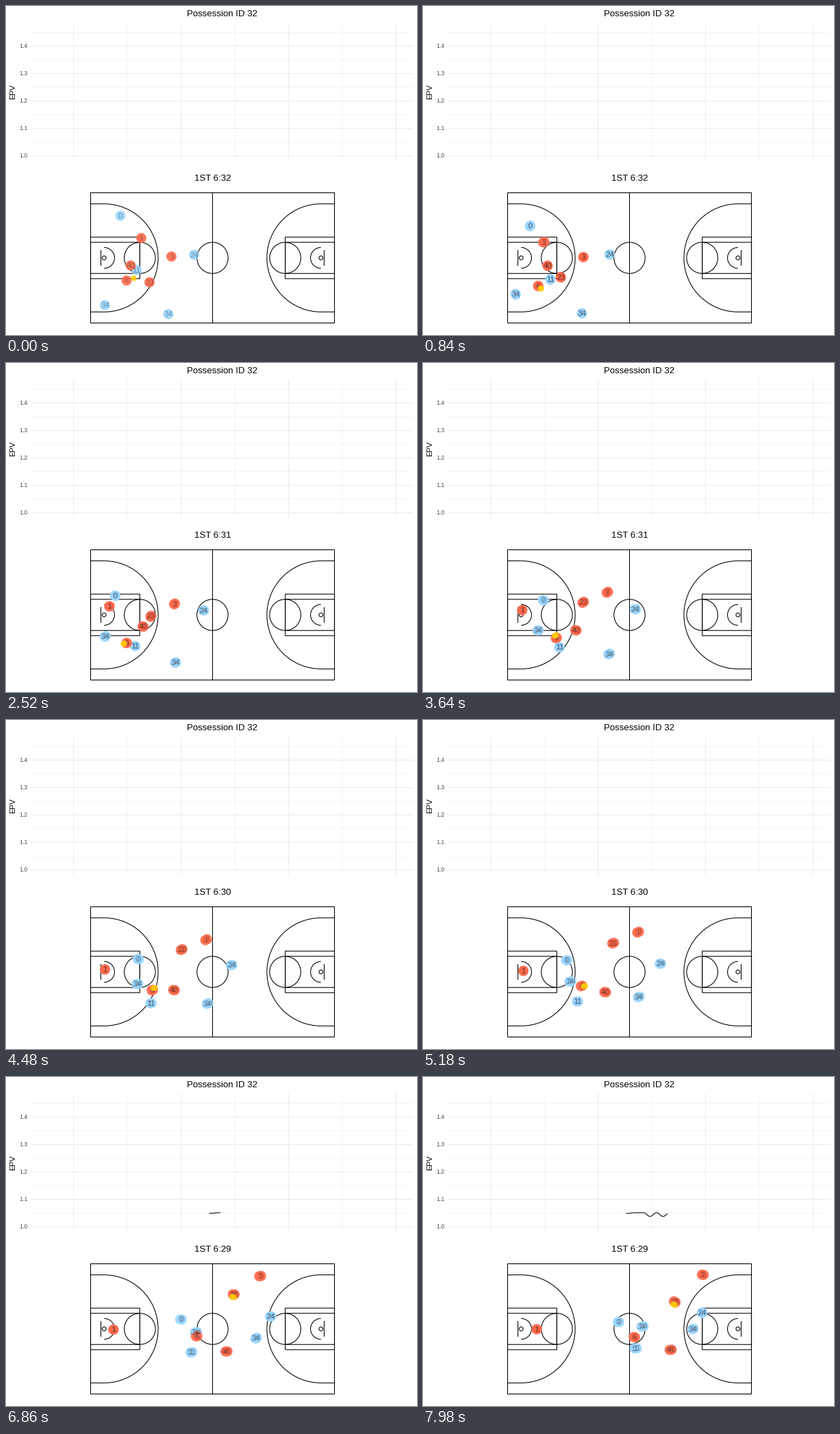
A matplotlib script for the animation above (8000 ms loop, 600 by 480 pixels).

```python
import numpy as np
import matplotlib.pyplot as plt
from matplotlib.animation import FuncAnimation
from matplotlib.patches import Arc, Circle, Rectangle

plt.rcParams["font.family"] = "Liberation Sans"
plt.rcParams["path.snap"] = False
PT = 0.72            # points per pixel at 100 dpi
STEP, TICK, LOOP = 140, 40, 8000
LAG = 0.29           # each step shows two tracking samples, +-LAG apart
DISC, BALL, NUM = 14.8, 8.4, 11.38
BLUE, RED, GOLD = "#9BD6FF", "#FF6A4D", "#FFCB00"
FT = 3.79            # pixels per foot
CX, CY = 301, 367.5  # centre of the court
EPV_X, EPV_STEP, EPV_SPEED = 296, 46, 5.5

fig = plt.figure(figsize=(6, 4.8), dpi=100, facecolor="white")
ax = fig.add_axes([0, 0, 1, 1])
ax.set(xlim=(-0.5, 599.5), ylim=(480, 0))
ax.axis("off")


def line(xs, ys, color="black", width=1.07, z=2):
    return ax.plot(xs, ys, color=color, lw=width * PT, zorder=z,
                   solid_capstyle="butt")[0]


def baseline(y, size):
    """Baseline that centres digits vertically on y."""
    return y + 0.358 * size - 0.5


def label(x, y, s, size, ha="center", color="black", **kw):
    return ax.text(x, baseline(y, size), s, size=size * PT, ha=ha,
                   va="baseline", color=color, **kw)


def shape(patch):
    patch.set(fill=False, edgecolor="black", linewidth=1.07 * PT, zorder=2)
    ax.add_patch(patch)


def draw_chart():
    for i in range(5):
        y = 58.5 + 40 * i
        line([36, 594], [y, y], "#EBEBEB", z=1)
        line([36, 594], [y - 20, y - 20], "#EBEBEB", 0.53, 1)
        label(31, y, f"{1.4 - 0.1 * i:.1f}", 8.8, "right", "#4D4D4D")
    for i in range(7):
        x = 98.2 + 78.45 * i
        line([x, x], [24, 226], "#EBEBEB", 0.53 if i % 2 else 1.07, 1)
    label(315, 10.5, "Possession ID 32", 13.2)
    ax.text(9.5, 124.5, "EPV", size=11 * PT, rotation=90,
            ha="center", va="center")


def draw_court():
    w, h, arc = 178, 95, 20.8 * FT
    shape(Rectangle((CX - w, CY - h), 2 * w, 2 * h))
    line([CX, CX], [CY - h, CY + h])
    shape(Circle((CX, CY), 6 * FT))
    for s in (-1, 1):
        base = CX + s * w
        board, hoop, foul = (CX + s * d * FT for d in (43, 41.75, 28))
        for half in (8 * FT, 6 * FT):
            shape(Rectangle((min(base, foul), CY - half),
                            abs(base - foul), 2 * half))
        shape(Circle((foul, CY), 6 * FT))
        shape(Circle((hoop, CY), 0.75 * FT))
        line([board, board], [CY - 3 * FT, CY + 3 * FT])
        turn = 90 * s
        for r in (4 * FT, arc):
            shape(Arc((hoop, CY), 2 * r, 2 * r, theta1=turn, theta2=turn + 180))
        for y in (CY - arc, CY + arc):
            line([base, hoop], [y, y])


def run(*points):
    """Cubic motion through four points spread over the loop."""
    coef = np.polyfit((0, 18, 37, 57), points, 3)
    return lambda t: t ** np.arange(3, -1, -1) @ coef


blues = [
    ("0", run((166.5, 306), (159, 339.5), (209.5, 350.5), (285, 357.5))),
    ("24", run((274, 363), (288, 361), (346, 355.5), (407, 344))),
    ("11", run((190, 385), (188, 413), (225, 410.5), (310, 396))),
    ("34", run((144, 436.5), (144.5, 399), (214.5, 381.5), (320, 364))),
    ("34", run((236.5, 449.5), (247, 437), (314.5, 404), (393.5, 367.5))),
]
reds = [
    ("1", run((197, 338.5), (150.5, 355), (146, 366), (165.5, 368))),
    ("3", run((241, 365.5), (245.5, 351.5), (313.5, 309.5), (408, 288.5))),
    ("40", run((181.5, 378.5), (199.5, 384.5), (265.5, 397), (361, 398))),
    ("6", run((175.5, 400.5), (175.5, 408.5), (231, 388), (308, 379.5))),
    ("23", run((209, 403), (211, 369.5), (277, 325.5), (367, 328))),
]
players = blues + reds
passer, receiver = reds[3][1], reds[4][1]


def ball_at(t):
    """Circles the passer, then flies to the receiver."""
    turn = np.radians(10.3 * t - 18)
    reach = 4 + 7 * np.exp(-t / 4)
    held = passer(t) + reach * np.array([np.cos(turn), np.sin(turn)])
    caught = receiver(t) + (-1, 4)
    return held + (caught - held) * np.clip((t - 38) / 9, 0, 1)


def epv_curve(u):
    rise = 0.9 * np.clip((u - 4) / 8, 0, 1)
    waves = 5.4 * np.sin(np.pi * (u - 25.5) / 19) ** 2 * (u > 25.5)
    return 198.9 - rise + waves


draw_chart()
draw_court()
clock = label(301.5, 250.5, "", 13.2)
epv = line([], [], z=3)

count = 2 * len(players)
discs = ax.scatter([0] * count, [0] * count, s=(DISC * PT) ** 2,
                   c=([BLUE] * 5 + [RED] * 5) * 2, alpha=0.9,
                   linewidths=0, zorder=4)
numbers = [label(0, 0, name, NUM, alpha=0.35, zorder=5)
           for name, _ in players * 2]
ball = ax.scatter([0, 0], [0, 0], s=(BALL * PT) ** 2, c=[GOLD] * 2,
                  alpha=0.85, linewidths=0, zorder=6)


def update(i):
    k = (i * TICK + TICK // 2) // STEP
    samples = [k - LAG, k + LAG] if k else [0.0]
    spots = np.array([path(t) for t in samples for _, path in players])
    discs.set_offsets(spots)
    ball.set_offsets([ball_at(t) for t in samples])
    for num in numbers:
        num.set_visible(False)
    for num, (x, y) in zip(numbers, spots):
        num.set(visible=True, position=(x, baseline(y, NUM)))
    clock.set_text(f"1ST 6:{32 - max(0, (k - 2) // 14)}")
    u = np.linspace(0, max(0, EPV_SPEED * (k - EPV_STEP)), 100)
    epv.set_data(EPV_X + u, epv_curve(u))
    epv.set_visible(k > EPV_STEP)
    return discs, ball, clock, epv, *numbers


anim = FuncAnimation(fig, update, frames=LOOP // TICK, interval=TICK,
                     repeat=True, repeat_delay=0, blit=False)
plt.show()
```
